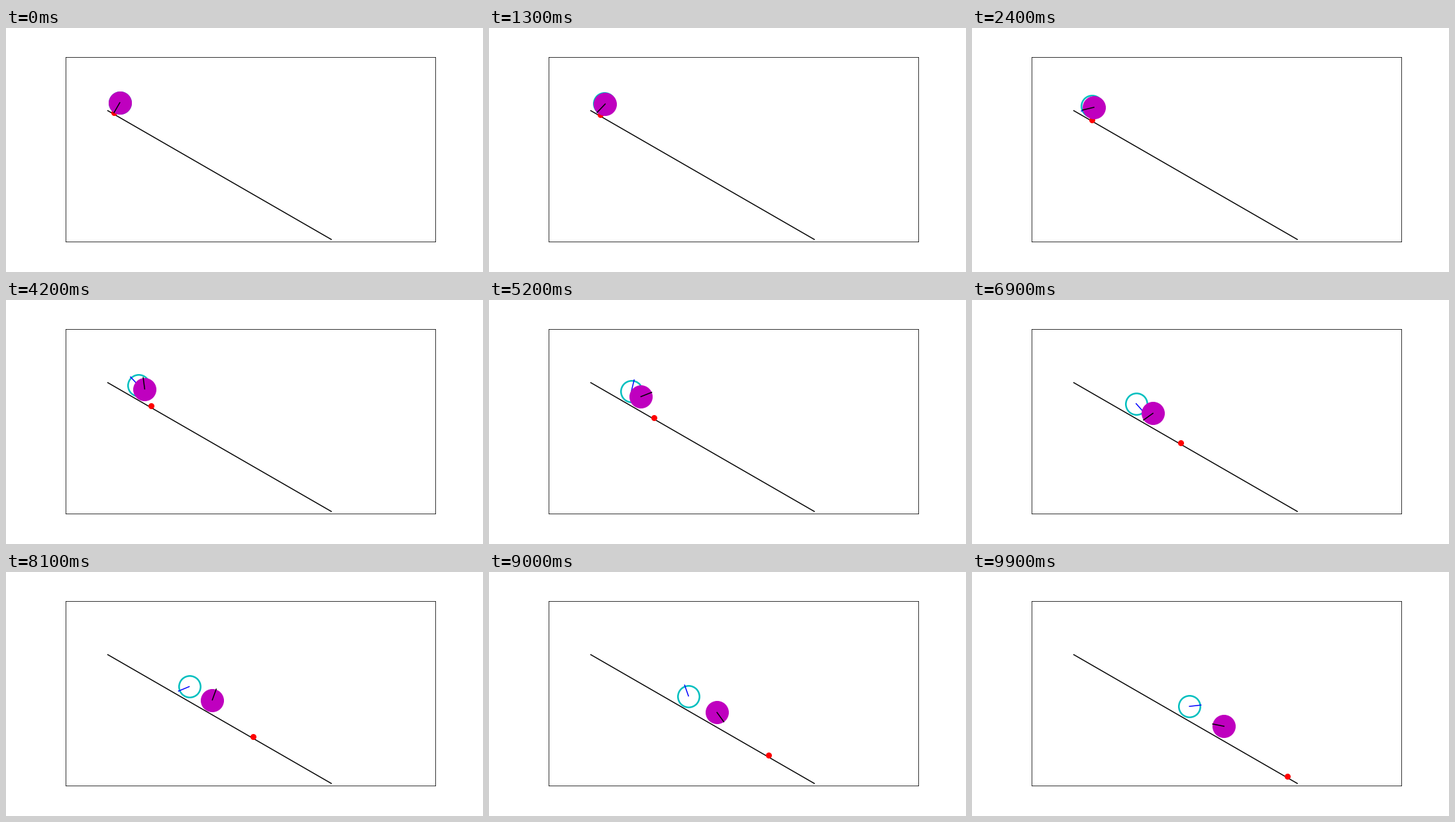
Animation of 720 by 369 pixels, one loop 10 s. Source, as a matplotlib script:

```python
import numpy as np
import matplotlib.pyplot as plt
from matplotlib.animation import FuncAnimation

W, H, DPI = 720, 369, 72
BOX_W, BOX_H, TOP = 558 / W, 279 / H, 0.88
FRAMES = 100
SLOPE = np.radians(30)
DOWN = np.array([np.cos(SLOPE), -np.sin(SLOPE)])
INWARD = np.array([-np.sin(SLOPE), -np.cos(SLOPE)])
START = np.array([4.19, 11.2]) - INWARD   # wheel centre at rest
SLIDE = 20.72 / 99 ** 2                   # distance of the sliding dot per step squared

fig = plt.figure(figsize=(W / DPI, H / DPI), dpi=DPI, facecolor="white")
ax = fig.add_axes([0.125, TOP - BOX_H, BOX_W, BOX_H])
ax.set(xlim=(0, 32), ylim=(0, 16), xticks=[], yticks=[])
for spine in ax.spines.values():
    spine.set_linewidth(0.8)

MAGENTA, CYAN = (0.75, 0, 0.75), (0, 0.75, 0.75)


def marker(size, edge, color, face):
    return ax.plot([], [], "o", ms=size, mew=edge, mec=color, mfc=face)[0]


def spoke(color):
    return ax.plot([], [], color=color, lw=1.5)[0]


ax.plot([3.65, 23], [11.37, 0.2], color="black", lw=1.5)
hoop = marker(32.5, 2.5, CYAN, "none")
hoop_spoke = spoke("blue")
dot = marker(8, 1, "red", "red")
disc = marker(34, 1, MAGENTA, MAGENTA)
disc_spoke = spoke("black")


def roll(body, line, dist):
    """Place a unit wheel that has rolled the given distance."""
    x, y = START + dist * DOWN
    a = np.arctan2(INWARD[1], INWARD[0]) - dist
    body.set_data([x], [y])
    line.set_data([x, x + np.cos(a)], [y, y + np.sin(a)])


def draw(i):
    s = SLIDE * i ** 2
    roll(hoop, hoop_spoke, s / 2)
    roll(disc, disc_spoke, s * 2 / 3)
    x, y = START + INWARD + s * DOWN
    dot.set_data([x], [y])
    return hoop, hoop_spoke, dot, disc, disc_spoke


anim = FuncAnimation(fig, draw, frames=FRAMES, interval=100,
                     repeat=True, repeat_delay=0, blit=False)
plt.show()
```
